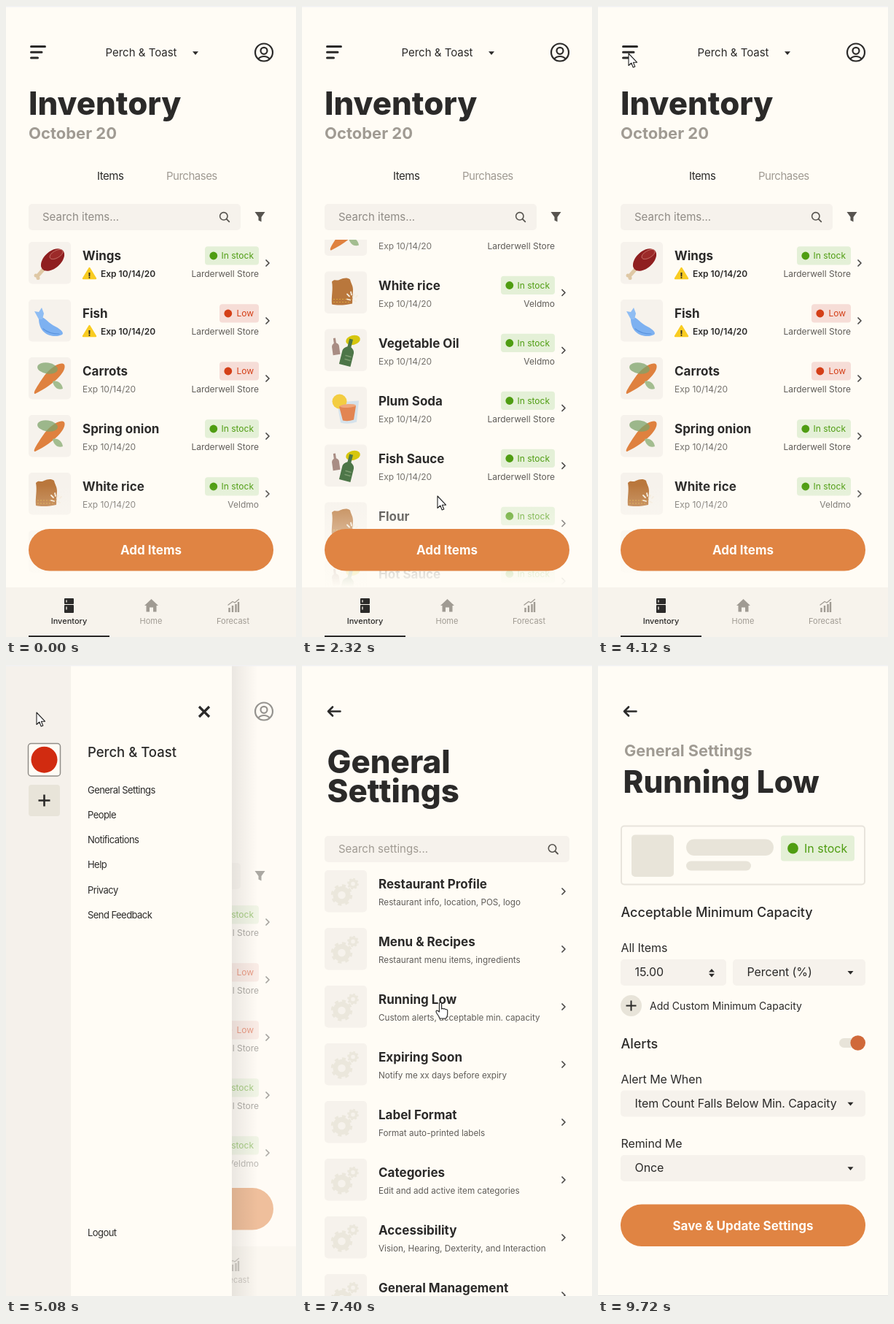
Recreate the animation shown at these times as an HTML page. Size 398 by 864 pixels, loop 9.76 s.

```html
<!DOCTYPE html>
<html lang="en">
<head>
<meta charset="utf-8">
<title>Inventory prototype</title>
<style>
  html, body { margin: 0; width: 100%; height: 100%; overflow: hidden; background: #fffcf5; }
  svg { display: block; width: 100vw; height: 100vh; font-family: Inter, sans-serif; }
</style>
</head>
<body>
<svg id="stage" viewBox="0 0 398 864"></svg>
<script>
const LOOP = 9760, W = 398;
const BG = '#fffcf5', PANEL = '#f6f2ec', SAND = '#e8e4d9', INK = '#2b2a29', GREY = '#a09b93', ORANGE = '#e08443';

// Drawing helpers
const text = (x, y, s, size, fill = INK, weight = 400, anchor = 'start', spacing = 0) =>
  `<text x="${x}" y="${y}" font-size="${size}" fill="${fill}" font-weight="${weight}" text-anchor="${anchor}" letter-spacing="${spacing}">${s.replace(/&/g, '&amp;')}</text>`;
const heading = (x, y, s, size = 43.8) => text(x, y, s, size, INK, 800);
const box = (x, y, w, h, r, fill, extra = '') =>
  `<rect x="${x}" y="${y}" width="${w}" height="${h}" rx="${r}" fill="${fill}" ${extra}/>`;
const disc = (x, y, r, fill) => `<circle cx="${x}" cy="${y}" r="${r}" fill="${fill}"/>`;
const oval = (x, y, rx, ry, turn, fill, extra = '') =>
  `<ellipse rx="${rx}" ry="${ry}" transform="translate(${x} ${y}) rotate(${turn})" fill="${fill}" ${extra}/>`;
const shape = (d, fill, extra = '') => `<path d="${d}" fill="${fill}" ${extra}/>`;
const line = (d, color, width, cap = 'round') =>
  `<path d="${d}" fill="none" stroke="${color}" stroke-width="${width}" stroke-linecap="${cap}" stroke-linejoin="round"/>`;
const group = (content, x = 0, y = 0, extra = '') => `<g transform="translate(${x} ${y})" ${extra}>${content}</g>`;

const chevron = (x, y) => line(`M${x - 2} ${y - 4}l4 4l-4 4`, '#4a4846', 1.7);
const caret = (x, y, up = 1) => shape(`M${x - 4} ${y - 2.2 * up}h8l-4 ${4.6 * up}z`, INK);
const lens = (x, y) =>
  `<circle cx="${x}" cy="${y}" r="5.2" fill="none" stroke="#57544f" stroke-width="1.6"/>` + line(`M${x + 4} ${y + 4}l3.5 3.5`, '#57544f', 1.8);
const plus = (x, y, r, width) => line(`M${x - r} ${y}h${2 * r}M${x} ${y - r}v${2 * r}`, INK, width, 'butt');
const backArrow = line('M36 63.5H52.5M42 57.5L36 63.5L42 69.5', INK, 2.6);
const button = (y, label) => box(31, y, 336, 57.5, 28.75, ORANGE) + text(199, y + 35, label, 17, '#fffdf8', 700, 'middle');
const field = (x, y, w, label) => box(x, y, w, 36, 5, PANEL) + text(x + 19.5, y + 23.3, label, 16, INK, 400, 'start', -.1);

// Food thumbnails, each in a 58 px square
const carrot = shape('M49 10C53 18 36 37 9 50C6 50 8 45 19 29C29 14 44 5 49 10Z', '#df813f')
  + oval(26, 15, 14, 7.5, 8, '#7ea36b', 'opacity=".75"')
  + shape('M33 33C40 31 46 36 47 43C40 46 34 40 33 33Z', '#a3bd90');
const sack = shape('M10 14C14 9 17 14 21 11C26 9 31 8 35 11C36 16 39 19 39 25L38 44C30 46 18 47 10 45C9 34 12 25 10 14Z', '#b9773c')
  + `<path d="M12 38H37M12 42H36" stroke="#d8a43c" stroke-width="1.2" stroke-dasharray="2 2"/>`
  + line('M31 31l3 3M36 28l1 4M41 31l-2 4M31 38l4 1M39 39l4 2M43 35l2-2', '#f4ebdc', 1.8);
const bottle = color => shape('M-2.5-19H2.5V-8Q8-5 8-1V18H-8V-1Q-8-5-2.5-8Z', color);
const bottles = oval(39, 15, 10, 6.5, -14, '#d6c60d')
  + `<g transform="translate(15 24) rotate(-8) scale(.62)">${bottle('#a98d84')}</g>`
  + `<g transform="translate(32 32) rotate(14)">${bottle('#4d7648')}</g>`
  + line('M29 36L36 38M28 41L35 43', '#7c9c70', 1.4);
const art = {
  wing: line('M20 38L12 47', '#dfc8a5', 5) + disc(10, 46, 2.5, '#dfc8a5') + disc(13, 49.5, 2.5, '#dfc8a5')
    + oval(33, 24.5, 19, 11.5, -42, '#8f1f20') + oval(38, 17, 10, 5, -30, '#9c2a29', 'stroke="#c9786d" stroke-width=".8"'),
  fish: shape('M14 24C22 22 27 33 37 37C45 41 49 46 46 48C36 53 13 50 14 24Z', '#7db1f1')
    + shape('M14 27L8 16L14 17L18 11L21 19L19 27Z', '#8fbdf3') + line('M20 40Q28 47 42 47', '#5b94de', 1.2),
  carrot, sack, bottles,
  soda: shape('M17 21L47 19L44 48Q33 52 22 49Z', '#cfe0ec', 'opacity=".85"') + disc(20.5, 20, 10, '#f3cd42')
    + shape('M20 27Q32 22 43 26L40 45Q32 48 25 46Z', '#e28553') + oval(32, 26, 11, 2.5, -3, '#efa77c')
};

// Inventory screen
const DEPOT = 'Larderwell Store', BULK = 'Veldmo';
const items = [
  ['Wings', 'wing', DEPOT, 0, 1], ['Fish', 'fish', DEPOT, 1, 1], ['Carrots', 'carrot', DEPOT, 1],
  ['Spring onion', 'carrot', DEPOT], ['White rice', 'sack', BULK], ['Vegetable Oil', 'bottles', BULK],
  ['Plum Soda', 'soda', DEPOT], ['Fish Sauce', 'bottles', DEPOT], ['Flour', 'sack', DEPOT], ['Hot Sauce', 'bottles', DEPOT]
];

const stockChip = low => {
  const [x, fill, color, label] = low ? [293, '#f6ddd7', '#d43f17', 'Low'] : [273, '#e4f0d7', '#4f9d12', 'In stock'];
  return box(x, 6.2, 347 - x, 25.4, 4, fill) + disc(x + 11.8, 19, 5.4, color) + text(340, 23.3, label, 12, color, 400, 'end');
};
const row = (y, thumb, title, rest) =>
  group(box(31, 0, 58, 57.5, 5, PANEL) + group(thumb, 31) + text(105, 25.3, title, 17, INK, 700) + chevron(359, 29) + rest, 0, y);
const itemRow = ([name, pic, shop, low, expiring], i) => row(323 + 79 * i, art[pic], name,
  (expiring
    ? shape('M114.5 36L123 50H106Z', '#f9cc22', 'stroke="#f9cc22" stroke-width="2.4" stroke-linejoin="round"')
      + text(114.5, 49.5, '!', 11, INK, 800, 'middle') + text(130, 48, 'Exp 10/14/20', 12, INK, 600)
    : text(105, 48, 'Exp 10/14/20', 12, '#74716c'))
  + stockChip(low) + text(347, 48, shop, 12, '#5f5c58', 400, 'end'));

const tabBar = box(0, 796, W, 68, 0, '#f7f3ec')
  + box(80, 811, 13, 8, 1, INK) + box(80, 820, 13, 11, 1, INK) + line('M83 814v2M83 823v3', '#f7f3ec', 1.3)
  + shape('M199.5 812L209 821H206.5V829.5H202V823.5H197V829.5H192.5V821H190Z', GREY)
  + line('M306.5 830v-6M311 830v-9M315.5 830v-11M319 830v-14', GREY, 2.4, 'butt')
  + line('M305 820L311 815.5L314 817L319.5 812.5', GREY, 1.3)
  + [['Inventory', 86.5, INK, 500], ['Home', 199, GREY, 400], ['Forecast', 311.5, GREY, 400]]
    .map(([s, x, c, w]) => text(x, 846, s, 11, c, w, 'middle')).join('')
  + box(31, 862, 111, 2, 0, INK);

const inventory = box(0, 0, W, 864, 0, BG)
  + line('M34.5 55.5H53.5M34.5 63.2H49M34.5 71H43.5', INK, 3)
  + text(185.5, 69, 'Perch & Toast', 15, INK, 400, 'middle') + caret(260, 64.5)
  + `<g fill="none" stroke="${INK}" stroke-width="2.2"><circle cx="354" cy="63.5" r="12"/><circle cx="354" cy="61.3" r="4.5"/><path d="M346.3 72.5Q349 69 354 69T361.700 72.5"/></g>`
  + heading(31, 149, 'Inventory') + text(31, 182, 'October 20', 22, GREY, 700)
  + text(125, 238, 'Items', 15, INK, 400, 'start', -.5) + text(220, 238, 'Purchases', 15, GREY, 400, 'start', -.5)
  + box(31, 271, 291, 36, 5, PANEL) + text(50, 294.3, 'Search items...', 15, '#8f8b85') + lens(298.8, 287.8)
  + shape('M341.5 282H355.5L350.5 289V295.5L346.5 293.5V289Z', '#57544f')
  + `<g clip-path="url(#listClip)"><g id="list">${items.map(itemRow).join('')}</g></g>`
  + box(0, 655, W, 141, 0, 'url(#fade)') + button(716, 'Add Items') + tabBar;

// Side menu
const menu = ['General Settings', 'People', 'Notifications', 'Help', 'Privacy', 'Send Feedback'];
const drawer = box(310, 0, 36, 864, 0, 'url(#shadow)') + box(0, 0, 310, 864, 0, BG) + box(0, 0, 89, 864, 0, '#f5f1eb')
  + box(30.5, 107.5, 44, 44.5, 4, BG, 'stroke="#908d88" stroke-width="1.5"') + disc(52.5, 129.7, 18, '#d12b10')
  + box(31, 164, 43, 43, 4, SAND) + plus(52.5, 185.5, 8, 2.6)
  + line('M265 57L279 71M279 57L265 71', INK, 3.2, 'butt')
  + text(112, 126.3, 'Perch & Toast', 18.5, INK, 500)
  + menu.map((s, i) => text(112, 176 + 34.15 * i, s, 13, INK, 400, 'start', -.55)).join('')
  + text(112, 782, 'Logout', 13, INK, 400, 'start', -.55);

// General settings screen
const ring = (x, y, r, w, dash = '') =>
  `<circle cx="${x}" cy="${y}" r="${r}" fill="none" stroke="#ebe7dc" stroke-width="${w}" ${dash}/>`;
const gear = (x, y, r) => ring(x, y, r * .62, r * .48) + ring(x, y, r * .9, r * .3, `stroke-dasharray="${r * .9 * Math.PI / 8}"`);
const gears = gear(23.5, 34, 14) + gear(39, 18.5, 7.5);
const settingsRows = [
  ['Restaurant Profile', 'Restaurant info, location, POS, logo'],
  ['Menu & Recipes', 'Restaurant menu items, ingredients'],
  ['Running Low', 'Custom alerts, acceptable min. capacity'],
  ['Expiring Soon', 'Notify me xx days before expiry'],
  ['Label Format', 'Format auto-printed labels'],
  ['Categories', 'Edit and add active item categories'],
  ['Accessibility', 'Vision, Hearing, Dexterity, and Interaction'],
  ['General Management', 'Staff, devices, and backups']
];
const settings = box(0, 0, W, 864, 0, BG) + backArrow
  + heading(34.5, 148, 'General') + heading(34.5, 188, 'Settings')
  + box(31, 234, 336, 36, 5, PANEL) + text(50, 257.3, 'Search settings...', 15, GREY) + lens(343.5, 251)
  + settingsRows.map(([title, note], i) => row(281 + 79 * i, gears, title, text(105, 48, note, 11.7, '#5f5c58'))).join('');

// Running low screen
const runningLow = box(0, 0, W, 864, 0, BG) + backArrow
  + text(36, 125, 'General Settings', 21.7, GREY, 700) + heading(34.5, 175, 'Running Low', 42.2)
  + box(32, 220.5, 334, 80, 4, 'none', 'stroke="#e8e4dc" stroke-width="2"')
  + box(46, 232.5, 58, 57.5, 5, SAND) + box(121, 238.5, 120, 22.5, 11.2, SAND) + box(121, 268.5, 89, 13, 6.5, SAND)
  + box(251, 233.5, 101, 35, 4, '#e4f0d7') + disc(267.5, 251, 7.4, '#4f9d12') + text(283, 257, 'In stock', 16, '#4f9d12')
  + text(31.5, 345, 'Acceptable Minimum Capacity', 18, INK, 500)
  + text(31.5, 393, 'All Items', 16, INK, 400, 'start', -.1)
  + field(31, 403, 145, '15.00') + caret(156, 418.3, -1) + caret(156, 425) + field(185, 403, 182, 'Percent (%)') + caret(346.5, 421.3)
  + disc(45.5, 466.5, 14.5, SAND) + plus(45.5, 466.5, 7, 2) + text(71, 472, 'Add Custom Minimum Capacity', 14)
  + text(31.5, 524.5, 'Alerts', 18, INK, 500)
  + box(331, 511, 32, 13, 6.5, SAND) + `<circle id="knob" cy="517.5" r="10.3"/>`
  + text(31.5, 572.5, 'Alert Me When', 16, INK, 400, 'start', -.1)
  + field(31, 582.5, 336, 'Item Count Falls Below Min. Capacity') + caret(346.5, 601)
  + text(31.5, 661, 'Remind Me', 16, INK, 400, 'start', -.1)
  + field(31, 671, 336, 'Once') + caret(346.5, 689.5)
  + button(738.5, 'Save & Update Settings') + box(0, 863, W, 1, 0, '#e4e3e2');

const stop = (offset, color, opacity) => `<stop offset="${offset}" stop-color="${color}" stop-opacity="${opacity}"/>`;
const pointerStyle = 'stroke="#222" stroke-width="1.1" stroke-linejoin="round"';
const stage = document.getElementById('stage');
stage.innerHTML = `<defs>
  <clipPath id="listClip"><rect y="320" width="398" height="476"/></clipPath>
  <linearGradient id="fade" x2="0" y2="1">${stop(0, BG, 0)}${stop(1, BG, 1)}</linearGradient>
  <linearGradient id="shadow">${stop(0, '#000', .08)}${stop(1, '#000', 0)}</linearGradient></defs>`
  + group(inventory + box(0, 0, W, 864, 0, BG, 'id="veil"') + group(drawer, 0, 0, 'id="drawer"'), 0, 0, 'id="home"')
  + group(settings, 0, 0, 'id="settings"') + group(runningLow, 0, 0, 'id="low"')
  + box(0, 0, W, 1.5, 0, '#f1f1f3')
  + group(shape('M0 0V16.5L3.8 13L6.2 19L8.8 18L6.4 12.2H11.5Z', '#fff', pointerStyle + ' id="arrow"')
    + shape('M-1.6 1Q0-1 1.6 1V9Q3 7.5 4.4 9Q6 8 7 9.7Q9 9 9.7 11V16Q9.5 20 7.5 22H-1Q-2 19-5 15Q-7 12-5 11Q-3.5 11-1.6 13Z', '#fff', pointerStyle + ' id="hand"'),
    0, 0, 'id="cursor"');

const el = {};
stage.querySelectorAll('[id]').forEach(node => el[node.id] = node);

// Motion
const span = (t, a, b) => Math.min(1, Math.max(0, (t - a) / (b - a)));
const easeOut = u => 1 - (1 - u) ** 3;
const easeInOut = u => u < .5 ? 4 * u ** 3 : 1 - 4 * (1 - u) ** 3;
const move = (node, x, y = 0) => node.setAttribute('transform', `translate(${x} ${y})`);
const show = (node, on) => node.setAttribute('opacity', +on);

// Cursor moves: start, end, x, y
const start = [329, 816];
const moves = [
  [640, 1240, 186, 671], [3100, 4000, 42, 65], [5240, 5840, 160, 167],
  [6720, 7260, 190, 462], [7980, 8520, 357, 515], [9000, 9440, 354, 729]
];
const handTimes = [[5760, 6300], [7100, 7720], [8480, 9560]];

function draw(t) {
  const scroll = easeInOut(span(t, 1640, 2240)) - easeInOut(span(t, 2960, 3400));
  move(el.list, 0, -275.5 * scroll);

  const open = easeOut(span(t, 4480, 4840));
  move(el.drawer, -350 * (1 - open));
  el.veil.setAttribute('opacity', .5 * open);

  const toSettings = easeOut(span(t, 6240, 6640)), toLow = easeOut(span(t, 7600, 8000));
  move(el.home, -W * toSettings);
  move(el.settings, W * (1 - toSettings - toLow));
  move(el.low, W * (1 - toLow));

  const on = easeInOut(span(t, 8640, 8840));
  el.knob.setAttribute('cx', 341.5 + 15.2 * on);
  el.knob.setAttribute('fill', on > .5 ? '#d0693a' : '#b9b4aa');

  let [x, y] = start;
  for (const [a, b, nextX, nextY] of moves) {
    const u = easeInOut(span(t, a, b));
    x += (nextX - x) * u;
    y += (nextY - y) * u;
  }
  const pointing = handTimes.some(([a, b]) => t >= a && t < b);
  move(el.cursor, x, y);
  show(el.cursor, t >= 640 && t < 9560);
  show(el.hand, pointing);
  show(el.arrow, !pointing);
}

function tick() {
  draw(performance.now() % LOOP);
  requestAnimationFrame(tick);
}
tick();
</script>
</body>
</html>
```
